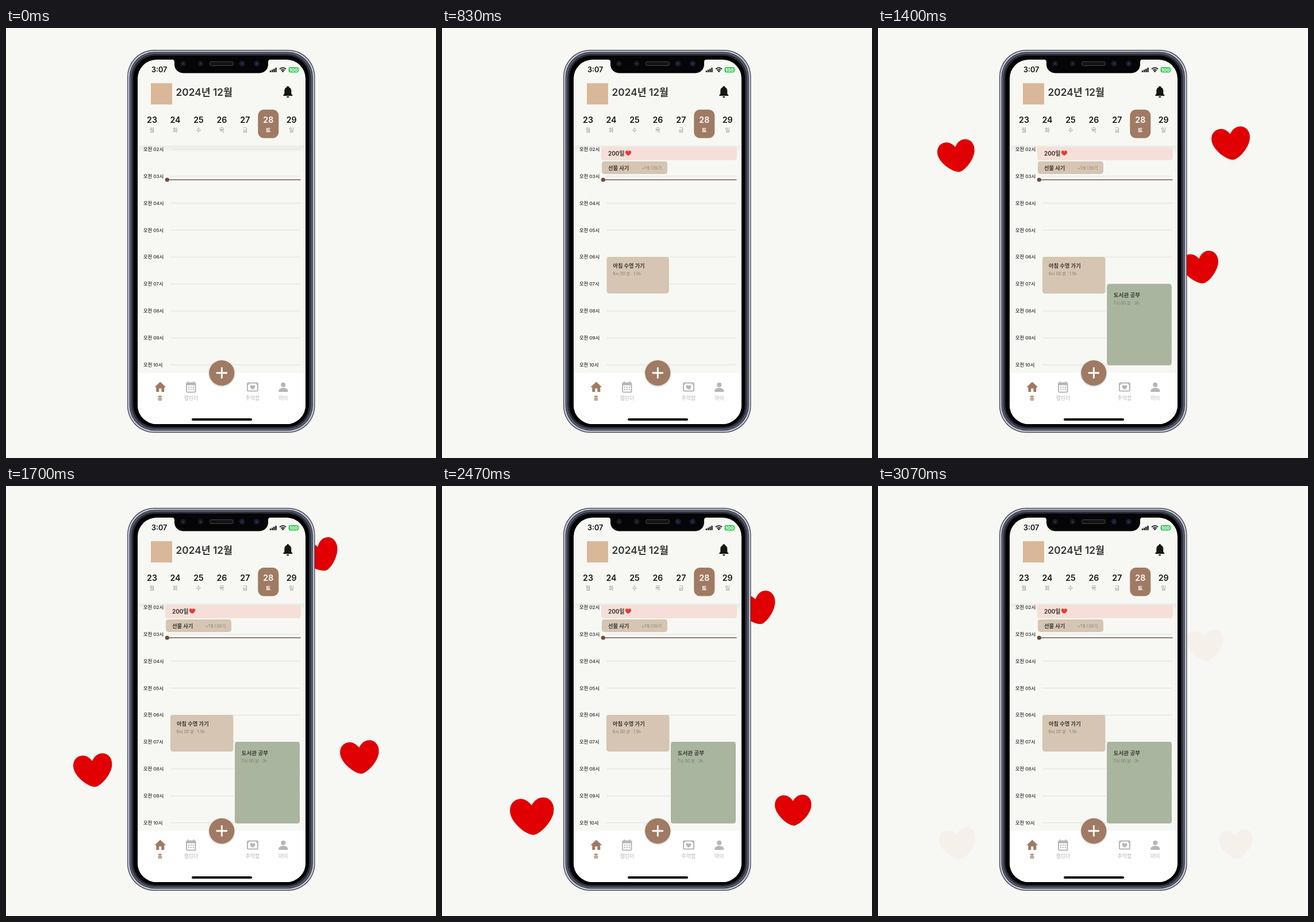
These frames come from a looping animation (748 px wide and 748 px high, 3510 ms). An HTML page with a canvas:

```html
<!DOCTYPE html>
<html lang="ko">
<head>
<meta charset="utf-8">
<title>Couple calendar</title>
<style>
html, body { margin: 0; width: 100%; height: 100%; overflow: hidden; background: #f7f8f3; }
canvas { display: block; width: 748px; height: 748px; }
</style>
</head>
<body>
<canvas id="stage"></canvas>
<script>
const SIZE = 748, LOOP = 3510, LAST = 92;
const BG = '#f7f8f3', BROWN = '#a07a63', GREY = '#b6b6b6';
const FONT = 'Inter, "Noto Sans CJK KR", "Noto Sans CJK", sans-serif';
const cv = document.getElementById('stage');
const c = cv.getContext('2d');
const dpr = window.devicePixelRatio || 1;
cv.width = cv.height = SIZE * dpr;

const clamp = v => Math.max(0, Math.min(1, v));
const lerp = (a, b, k) => a + (b - a) * k;

function box(x, y, w, h, r, fill) {
  c.fillStyle = fill;
  c.beginPath();
  c.roundRect(x, y, w, h, r);
  c.fill();
}
function dot(x, y, r, fill) {
  c.fillStyle = fill;
  c.beginPath();
  c.arc(x, y, r, 0, 7);
  c.fill();
}
function line(x1, y1, x2, y2, w, color) {
  c.strokeStyle = color;
  c.lineWidth = w;
  c.beginPath();
  c.moveTo(x1, y1);
  c.lineTo(x2, y2);
  c.stroke();
}
function text(s, x, y, size, weight, color, align = 'left') {
  c.font = `${weight} ${size}px ${FONT}`;
  c.textAlign = align;
  c.fillStyle = color;
  c.fillText(s, x, y);
}
function shape(d, x, y, fill) {
  c.save();
  c.translate(x, y);
  c.fillStyle = fill;
  c.fill(new Path2D(d));
  c.restore();
}

const HEART = new Path2D('M0-17C-5-25-12-29-19-28C-30-27-36-16-33-4C-30 9-14 25-3 28Q0 29 3 28C14 25 30 9 33-4C36-16 30-27 19-28C12-29 5-25 0-17Z');
function heart(x, y, w, deg, fill) {
  c.save();
  c.translate(x, y);
  c.rotate(deg * Math.PI / 180);
  c.scale(w / 68, w / 68);
  c.fillStyle = fill;
  c.fill(HEART);
  c.restore();
}

// Rising hearts. Track rows: height on the loop, x, y, width, tilt.
const RISE = 564, TOP = 64;
const PACE = [[1167, 0], [1700, 1523], [2467, 3688], [3067, 5321]];
const TRACKS = [
  { start: 303, rows: [[115, 140, 137, 64, -8], [303, 134, 325, 67, -12], [472, 152, 495, 68, -7], [563, 157.5, 574, 77, -4], [622, 140, 622, 64, -10]] },
  { start: 303, rows: [[115, 616, 115, 66, -6], [303, 613.5, 303, 69, -9], [472, 616, 472, 68, -6], [563, 611, 563, 64, -2], [622, 623, 622.5, 60, -5]] },
  { start: 517, rows: [[122, 548, 121, 65, -20], [213, 549, 212, 66, -14], [272, 569, 277, 64, -4], [517, 556, 517, 66, -15], [622, 552, 622, 64, -10]] }
];

function sample(rows, key) {
  let i = 0;
  while (i < rows.length - 2 && key > rows[i + 1][0]) i++;
  const a = rows[i], b = rows[i + 1];
  const k = (key - a[0]) / (b[0] - a[0]);
  return a.slice(1).map((v, n) => lerp(v, b[n + 1], k));
}

function drawHearts(t) {
  const alpha = Math.min(clamp((t - 1025) / 250), clamp((3076 - t) / 295));
  if (!alpha) return;
  const [travel] = sample(PACE, t);
  c.globalAlpha = alpha;
  for (const { start, rows } of TRACKS) {
    const u = TOP + (((start - travel - TOP) % RISE) + RISE) % RISE;
    if (u < 115) continue;
    const [x, y, w, deg] = sample(rows, u);
    heart(x, y, w, deg, '#e00003');
  }
  c.globalAlpha = 1;
}

function drawBody() {
  box(211, 38, 326.5, 666, 47, '#393b49');
  box(212.2, 39.2, 324.1, 663.6, 46, '#c6c8d4');
  box(214.6, 41.6, 319.3, 658.8, 44, '#3d4151');
  box(216, 43, 316.5, 656, 43, '#5b6071');
  box(218, 45, 312.5, 652, 41, '#2b2e38');
  box(221.5, 48, 305.5, 646, 38, '#000');
  box(229, 55, 292, 634, 33, BG);

  // notch
  box(293, 50, 163, 28.5, [0, 0, 15, 15], '#050507');
  shape('M-4 0H0V4Q0 0-4 0Z', 293, 55, '#050507');
  shape('M4 0H0V4Q0 0 4 0Z', 456, 55, '#050507');
  box(354, 58, 42, 8, 4, '#3f4043');
  box(355, 59, 40, 6, 3, '#141416');
  [[308, '#17181c'], [338.5, '#17181c'], [410.5, '#161c33'], [436, '#161c33']].forEach(([x, col]) => {
    dot(x, 62, 5, col);
    dot(x, 62, 1.6, '#34394a');
  });
}

function drawStatus() {
  text('3:07', 253, 77, 12.6, 600, '#111');
  [3, 4.5, 6.3, 8].forEach((h, i) => box(458.8 + i * 3.2, 77 - h, 2.3, h, 0.7, '#111'));
  c.strokeStyle = '#111';
  c.lineWidth = 1.8;
  [4.7, 7.8].forEach(r => {
    c.beginPath();
    c.arc(481.6, 77, r, -Math.PI * 0.75, -Math.PI * 0.25);
    c.stroke();
  });
  shape('M0 0L-2-2.4Q0-4 2-2.4Z', 481.6, 77.3, '#111');
  box(491.5, 68, 17.5, 9.6, 3, '#3ccb5a');
  box(509.6, 71, 1.2, 3.6, 0.6, '#9fe0ad');
  text('100', 500.2, 76, 8.2, 700, '#fff', 'center');
}

function drawHeader() {
  box(252, 96, 37, 37, 0, '#d9b899');
  text('2024년 12월', 295.5, 117.5, 17.3, 600, '#333');
  shape('M0-10.5C1.2-10.5 1.9-9.7 1.9-8.5C4.8-7.6 6-5 6-2V3L8 5.2V6.4H-8V5.2L-6 3V-2C-6-5-4.8-7.6-1.9-8.5C-1.9-9.7-1.2-10.5 0-10.5ZM-2.2 7.6H2.2A2.2 2.2 0 0 1-2.2 7.6Z', 490.3, 111.5, '#161616');

  box(438.3, 142, 36, 49.5, 10, BROWN);
  [...'월화수목금토일'].forEach((d, i) => {
    const x = 254 + i * 40.45, on = i === 5;
    text(23 + i, x, 165, 14.2, 600, on ? '#fff' : '#161616', 'center');
    text(d, x, 180.5, 9.6, on ? 600 : 400, on ? '#fff' : '#929292', 'center');
  });
  const g = c.createLinearGradient(0, 204, 0, 217);
  g.addColorStop(0, 'rgba(0,0,0,.055)');
  g.addColorStop(1, 'rgba(0,0,0,0)');
  c.fillStyle = g;
  c.fillRect(229, 204.5, 292, 13);
}

function drawHours() {
  for (let i = 0; i < 9; i++) {
    const y = 211 + i * 46.87;
    line(286, y, 512, y, 1, '#dfe0dd');
    text(`오전 ${String(i + 2).padStart(2, '0')}시`, 239, y + 3, 8.2, 600, '#4c4c4c');
  }
  line(280, 264, 512.5, 264, 1.5, '#75594e');
  dot(280.3, 264, 3.6, '#6d4c41');
}

function drawNav() {
  box(229, 600, 292, 89, [0, 0, 33, 33], '#fff');
  c.save();
  c.shadowColor = 'rgba(0,0,0,.3)';
  c.shadowBlur = 3 * dpr;
  c.shadowOffsetY = dpr;
  dot(375.3, 600, 22, BROWN);
  c.restore();
  box(365.3, 598.6, 20, 2.9, 1.4, '#fff');
  box(373.9, 590, 2.9, 20, 1.4, '#fff');

  shape('M0-9L10 .2H7V8.5H2V2.5H-2V8.5H-7V.2H-10Z', 268.3, 624.5, BROWN);

  box(313, 616.5, 17.5, 18, 2.5, GREY);
  box(316, 614.8, 2, 4, 0.5, GREY);
  box(325.5, 614.8, 2, 4, 0.5, GREY);
  box(315, 621.5, 13.5, 11, 0.5, '#fff');
  for (let i = 0; i < 6; i++) box(316.7 + (i % 3) * 4, 623.7 + (i > 2) * 4, 2.2, 2.2, 0.3, GREY);

  box(419, 616.5, 20, 16, 2, GREY);
  box(421, 618.5, 16, 12, 0.5, '#fff');
  shape('M0 0H3.2L0 3ZM16 0H12.8L16 3Z', 421, 618.5, GREY);
  heart(429, 625, 9, 0, GREY);

  dot(482.3, 620.8, 4, GREY);
  shape('M-8 0C-8-3.4-3-5 0-5S8-3.4 8 0V2H-8Z', 482.3, 631, GREY);

  [['홈', 268], ['캘린더', 322], ['추억함', 428.8], ['마이', 482.3]].forEach(([s, x], i) =>
    text(s, x, 646.5, 9, i ? 400 : 600, i ? GREY : BROWN, 'center'));
  box(323, 679, 105, 4, 2, '#000');
}

const INK = '#3b3733';
const CARDS = [
  { at: 25, x: 277, y: 207, w: 236, h: 23, fill: '#f5dfd8', draw() {
    text('200일', 289, 221.7, 9.8, 700, INK);
    heart(324, 217.5, 10.4, 0, '#ea3a34');
  } },
  { at: 285, x: 278, y: 232, w: 114, h: 22, fill: '#d5c5b2', draw() {
    text('선물 사기', 289, 246.6, 9.3, 700, INK);
    text('+1개 더보기', 347, 245.6, 7, 400, '#8c8276');
  } },
  { at: 540, x: 286, y: 398, w: 109.5, h: 64, fill: '#d5c5b2', draw() {
    text('아침 수영 가기', 297, 417, 9.3, 700, INK);
    text('6시 00 분 · 1.5h', 297, 430, 7, 400, '#857b70');
  } },
  { at: 1004, x: 398, y: 445, w: 113, h: 142, fill: '#aab59f', draw() {
    text('도서관 공부', 409.7, 468, 9.6, 700, '#363b33');
    text('7시 00 분 · 3h', 409.7, 481.3, 7.1, 400, '#747d6d');
  } }
];

function drawCard(k, t) {
  const p = clamp((t - k.at) / 500);
  if (!p) return;
  const rest = p === 1 ? 0 : 2 ** (-10 * p);
  const turn = rest * rest, s = 1 - 0.6 * rest;
  const cx = k.x + k.w / 2, cy = k.y + k.h / 2;
  c.save();
  c.globalAlpha = clamp(p * 3);
  c.translate(cx - 45 * turn, cy - 30 * turn);
  c.rotate(-1.05 * turn);
  c.scale(s, s);
  c.translate(-cx, -cy);
  box(k.x, k.y, k.w, k.h, 4.5, k.fill);
  k.draw();
  c.restore();
}

function render(ms) {
  // thirty pictures a second, holding the last
  const t = Math.min(LAST, Math.floor((ms % LOOP) * 0.03 + 0.11)) * 100 / 3;
  c.setTransform(dpr, 0, 0, dpr, 0, 0);
  c.fillStyle = BG;
  c.fillRect(0, 0, SIZE, SIZE);
  drawHearts(t);
  drawBody();
  drawStatus();
  drawHeader();
  drawHours();
  drawNav();
  CARDS.forEach(k => drawCard(k, t));
}

const begin = performance.now();
function tick() {
  render(performance.now() - begin);
  requestAnimationFrame(tick);
}
tick();
</script>
</body>
</html>
```
